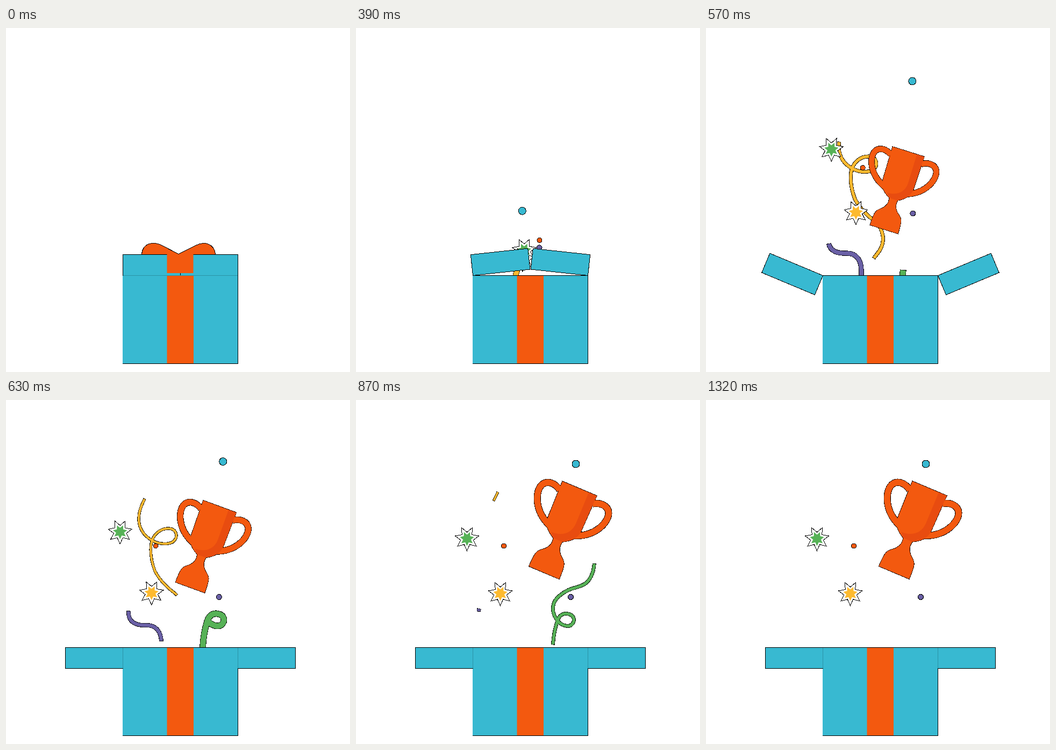
These frames come from a looping animation (640x640 px, 2.73 s). An HTML page:

```html
<!DOCTYPE html>
<html lang="en">
<head>
<meta charset="utf-8">
<title>Gift box</title>
<style>
  html, body { margin: 0; width: 100%; height: 100%; overflow: hidden; background: #fff; }
  svg { display: block; width: 100vw; height: 100vh; }
  .line { stroke: #000; shape-rendering: crispEdges; }
  .blue { fill: #38b9d1; }
  .orange { fill: #f3590f; }
</style>
</head>
<body>
<svg viewBox="0 0 640 640">
  <defs>
    <path id="cup" d="M-34.7 0H34.7L33.5 72C33 88 22 97 9 104C8 112 7 117 15 127C20 132 25 134 28 141C30 147 30.6 158 30.6 170H-30.6C-30.6 158-30 147-28 141C-25 134-20 132-15 127C-7 117-8 112-9 104C-22 97-33 88-33.5 72Z"/>
    <path id="handle" d="M-33 17C-46 8-62 9-67.5 21C-74 36-63 70-25 85"/>
    <g id="handles" fill="none"><use href="#handle"/><use href="#handle" transform="scale(-1 1)"/></g>
  </defs>

  <g id="streamers" fill="none"></g>
  <g id="dots"></g>
  <g id="trophy">
    <use href="#handles" class="line" stroke-width="13.2"/>
    <use href="#cup" class="line" stroke-width="1.6"/>
    <use href="#handles" stroke="#f3590f" stroke-width="11.6"/>
    <use href="#cup" class="orange"/>
    <path fill="#e84c10" d="M18.5 0H34.7L33.5 72C33 88 22 97 9 104H-9Q-13 101-17 95C5 95 19 82 19 62Z"/>
  </g>
  <g id="stars"></g>

  <path id="bow" class="orange line" d="M252.5 421.5C253 408 262 400.5 274 400.5C281 400.5 285 402 289 404L321 420.5L354 404C358 402 362 400.5 368 400.5C380 400.5 389 409 389.5 421.5Z"/>
  <path class="blue line" d="M217 460.5H431.5V624.5H217"/>
  <rect class="orange" x="299.5" y="461" width="49.5" height="163"/>
  <rect id="left" class="blue line" x="217.5" y="421.5" width="107" height="39"/>
  <rect id="right" class="blue line" x="324.5" y="421.5" width="107" height="39"/>
  <path id="seam" stroke="#2b93a7"/>
  <rect id="ribbon" class="orange" x="299.5" y="421" width="49"/>
</svg>
<script>
const LOOP = 2730, STEP = 30;
const $ = id => document.getElementById(id);

function set(el, attrs) {
  for (const k in attrs) el.setAttribute(k, attrs[k]);
}
function add(parent, tag, attrs) {
  const el = document.createElementNS('http://www.w3.org/2000/svg', tag);
  set(el, attrs);
  return parent.appendChild(el);
}

const mix = (a, b, p) => a + (b - a) * p;
const part = (t, from, to) => Math.min(1, Math.max(0, (t - from) / (to - from)));
const ease = (t, from, to) => {
  const x = part(t, from, to);
  return x * x * (3 - 2 * x);
};
const easeOut = (t, from, to, power) => 1 - (1 - part(t, from, to)) ** power;

function starPath(outer, inner) {
  const points = [];
  for (let i = 0; i < 14; i++) {
    const r = i % 2 ? inner : outer, a = Math.PI / 2 + i * Math.PI / 7;
    points.push([r * Math.cos(a), r * Math.sin(a)]);
  }
  return `M${points.join('L')}Z`;
}

// Each piece is thrown up to its peak, then settles; no radius means a star
const confetti = [
  { color: '#38b9d1', r: 7, from: [304, 540], peak: 95.5, to: [409, 119], settle: 665 },
  { color: '#f3590f', r: 4.5, from: [345, 508], peak: 256, to: [275, 271.5], settle: 630 },
  { color: '#6a60a6', r: 5, from: [338, 469], peak: 335, to: [399.5, 366.5], settle: 620 },
  { color: '#57b257', from: [318.5, 570], peak: 222, to: [206.5, 258], settle: 690 },
  { color: '#fdba2f', from: [312, 505], peak: 339, to: [268.5, 360], settle: 645 }
];
for (const c of confetti) {
  c.el = add($(c.r ? 'dots' : 'stars'), 'g', {});
  if (c.r) {
    add(c.el, 'circle', { r: c.r, fill: c.color, class: 'line' });
  } else {
    add(c.el, 'path', { d: starPath(22.5, 12), fill: '#fff', class: 'line' });
    add(c.el, 'path', { d: starPath(13.5, 7.5), fill: c.color });
  }
}

// A streamer is drawn from time grow on, and thins and vanishes around time fade
const streamers = [
  { color: '#fdba2f', grow: 375, fade: 480, thick: 11, thin: 5,
    d: 'M295 474C298 440 312 430 323 414C334 396 330 375 316 361C300 349 286 336 277 318C271 302 268 283 270 268C273 250 287 239 302 239C314 239 319 248 316 257C311 270 289 270 273 262C256 253 247 238 247 221C247 206 253 194 256 188L264 171' },
  { color: '#6a60a6', grow: 375, fade: 480, thick: 13, thin: 7.5,
    d: 'M289 485V451C289 432 280 419 262 419C240 420 224 412 229 388' },
  { color: '#57b257', grow: 545, fade: 745, thick: 12, thin: 5.8,
    d: 'M364 522L366 461C367 440 370 425 375 410C379 399 387 396 395 398C405 400 408 409 403 416C396 425 380 419 373 408C362 392 365 374 380 363C400 347 412 351 426 342C437 334 442 322 443.5 303' }
];
for (const s of streamers) {
  s.edge = add($('streamers'), 'path', { d: s.d, class: 'line' });
  s.core = add($('streamers'), 'path', { d: s.d, stroke: s.color });
  s.len = s.edge.getTotalLength();
}

function trim(el, a, b, width) {
  set(el, {
    'stroke-width': width,
    'stroke-dasharray': `0 ${a} ${Math.max(0, b - a)} 9999`,
    visibility: b > a ? 'visible' : 'hidden'
  });
}

function draw(t) {
  for (const { el, from, peak, to, settle } of confetti) {
    const x = mix(from[0], to[0], ease(t, 345, 675));
    const y = mix(from[1], peak, easeOut(t, 333, 554, 2)) + (to[1] - peak) * ease(t, 540, settle);
    set(el, { transform: `translate(${x} ${y})` });
  }

  for (const { edge, core, len, grow, fade, thick, thin } of streamers) {
    const head = len * easeOut(t, grow, grow + 440, 4);
    const tail = len * ease(t, fade, fade + 445);
    const width = mix(thick, thin, ease(t, fade - 90, fade + 210));
    trim(edge, tail, head, width);
    trim(core, tail + .8, head - .8, width - 1.6);
  }

  const rise = easeOut(t, 360, 960, 4);
  const x = mix(316, 416, ease(t, 350, 735)), y = mix(532, 164.5, rise);
  set($('trophy'), {
    transform: `translate(${x} ${y}) rotate(${mix(-7.6, 22.9, rise)}) scale(${mix(.39, 1, rise)})`
  });

  const tuck = ease(t, 60, 330), open = 180 * ease(t, 360, 630);
  set($('bow'), { transform: `translate(0 ${22 * tuck})`, visibility: tuck < 1 ? 'visible' : 'hidden' });
  set($('ribbon'), { height: 35 * (1 - tuck) });
  set($('left'), { transform: `rotate(${-open} 217.5 460.5)` });
  set($('right'), { transform: `rotate(${open} 431.5 460.5)` });
  set($('seam'), { d: open === 0 ? 'M218 460.5H431' : open === 180 ? 'M217.5 461V499M431.5 461V499' : '' });
}

const start = performance.now();
function tick(now) {
  const t = Math.floor((Math.max(0, now - start) % LOOP) / STEP) * STEP;
  draw(t < 90 ? 0 : t);
  requestAnimationFrame(tick);
}
tick(start);
</script>
</body>
</html>
```
